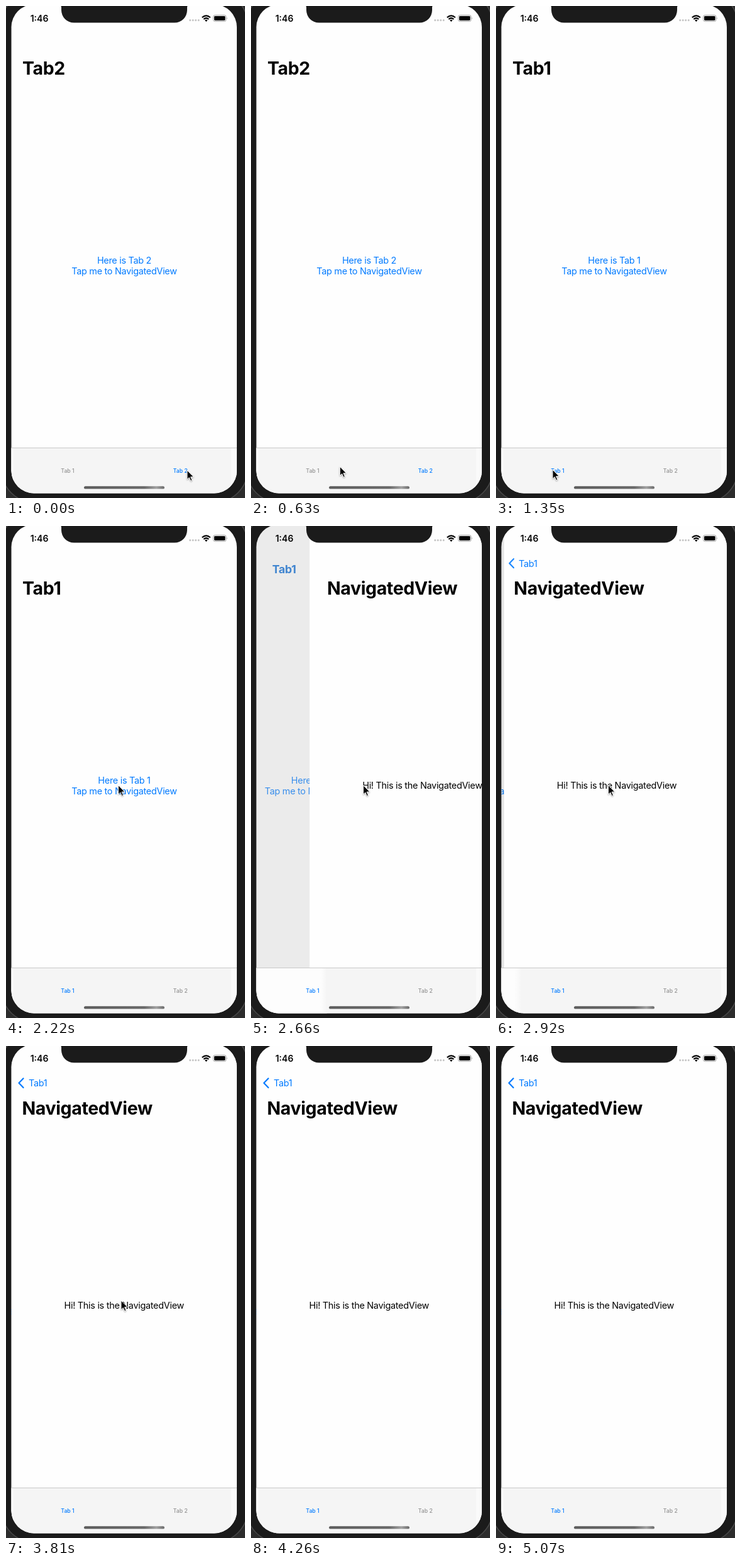
Write an HTML page that moves like this. It is 380 by 781 pixels and loops after 5.17 s.

```html
<!DOCTYPE html>
<html lang="en">
<head>
<meta charset="utf-8">
<title>Tab navigation</title>
<style>
  html, body { margin: 0; width: 100%; height: 100%; overflow: hidden; background: #1b1b1b; }
  svg { display: block; width: 100%; height: 100%; }
  text { font: 400 14.4px Inter, Roboto, sans-serif; letter-spacing: -.019em; font-optical-sizing: none; }
  .center { text-anchor: middle; }
  .title { font-weight: 700; font-size: 28.5px; letter-spacing: -.013em; }
  .tab { font-weight: 500; font-size: 8.7px; letter-spacing: 0; text-anchor: middle; }
  .clock { font-weight: 600; font-size: 14px; letter-spacing: 0; }
  .blue { fill: #007aff; }
  #cursor { filter: drop-shadow(0 1px 1px rgba(0, 0, 0, .35)); }
</style>
</head>
<body>
<svg viewBox="0 0 380 781">
  <defs>
    <clipPath id="screen"><rect x="8.5" y="-2.5" width="358.5" height="776" rx="36"/></clipPath>
    <linearGradient id="fade"><stop stop-color="#fdfdfd"/><stop offset="1" stop-color="#f5f5f5"/></linearGradient>
    <linearGradient id="bar">
      <stop stop-color="#5c5c5c"/><stop offset=".75" stop-color="#686868"/>
      <stop offset=".9" stop-color="#a0a0a0"/><stop offset="1" stop-color="#686868"/>
    </linearGradient>
  </defs>

  <rect width="380" height="781" fill="#2c2c2c"/>
  <rect x="-7" y="-23" width="391" height="811" rx="52" fill="#1b1b1b" stroke="#484848" stroke-width="1.5"/>

  <g clip-path="url(#screen)">
    <rect width="380" height="781" fill="#fefefe"/>
    <g id="parent" class="blue center">
      <text id="hello" x="188" y="408.7"></text>
      <text x="188" y="426.4">Tap me to NavigatedView</text>
    </g>
    <rect id="dim" width="380" height="702"/>
    <g id="page">
      <rect x="8.5" width="360" height="702" fill="#fefefe"/>
      <text class="center" x="187.8" y="417.2">Hi! This is the NavigatedView</text>
    </g>

    <text id="newTitle" class="title" y="109">NavigatedView</text>
    <text id="oldTitle" class="title"></text>
    <text id="back" class="blue"></text>
    <path id="chevron" d="M8 -7.3L1 0L8 7.3" fill="none" stroke="#007aff" stroke-width="2.2" stroke-linecap="round" stroke-linejoin="round"/>

    <rect y="701" width="380" height="80" fill="#f5f5f5"/>
    <rect id="glow" y="702" height="80" fill="#fdfdfd"/>
    <rect id="glowEdge" y="702" height="80" fill="url(#fade)"/>
    <rect x="358" y="702" width="10" height="80" fill="#fafafa"/>
    <rect y="701" width="380" height="1" fill="#c8c8c8"/>
    <text id="tab1" class="tab" x="98" y="740.7">Tab 1</text>
    <text id="tab2" class="tab" x="277.3" y="740.7">Tab 2</text>
    <rect x="124" y="762.2" width="128" height="4.4" rx="2.2" fill="url(#bar)"/>

    <path d="M82 -3Q88 -3 88 3V6.5A20 20 0 0 0 108 26.5H268A20 20 0 0 0 288 6.5V3Q288 -3 294 -3Z" fill="#1b1b1b"/>
    <text class="clock" x="38.7" y="24.5">1:46</text>
    <path d="M292.7 22.6h13.6" stroke="#c6c6c6" stroke-width="3.1" stroke-linecap="round" stroke-dasharray="0 4.5"/>
    <g fill="none" stroke="#000" stroke-width="2.2">
      <path d="M311.8 18.3Q318.3 12.5 324.8 18.3"/>
      <path d="M314.3 21Q318.3 17.5 322.3 21"/>
    </g>
    <path d="M316 22.6Q318.3 20.8 320.6 22.6L318.3 25Z"/>
    <rect x="329.5" y="14.5" width="20.5" height="10" rx="2.8" fill="none" stroke="#a2a2a2"/>
    <rect x="331" y="16" width="17.5" height="7" rx="1.4"/>
    <path d="M351.2 17.8q1.6 1.7 0 3.4z" fill="#999"/>
  </g>

  <path id="cursor" d="M0 0V14.5L3.3 11.5L5.8 17L8 16L5.6 10.6H10.3Z" stroke="#fff"/>
</svg>

<script>
const LOOP = 5170, PUSH = 2570, TAB_SWITCH = 1350, PRESS = 2400;
const BLUE = '#007aff', GREY = '#929292';
const $ = id => document.getElementById(id);
const clamp = (v, lo = 0, hi = 1) => Math.min(hi, Math.max(lo, v));
const set = (id, attrs) => {
  for (const name in attrs) $(id).setAttribute(name, attrs[name]);
};

// Index of the current step in an evenly stepped move, -1 before it begins.
const stepAt = (t, start, end, count) =>
  t < start ? -1 : Math.min(count - 1, Math.floor((t - start) / (end - start) * (count - 1) + 1e-6));

const bezier = (u, a, b, c, d) => {
  const v = 1 - u;
  return v * v * v * a + 3 * v * v * u * b + 3 * v * u * u * c + u * u * u * d;
};

function cursorAt(t) {
  const leave = stepAt(t, 3810, 4260, 6);
  if (leave >= 0) {
    const u = leave / 4;
    return [183 + 88 * u ** 1.2, 404 + 352 * u ** 1.5];
  }
  const rise = stepAt(t, TAB_SWITCH, 2220, 11);
  if (rise >= 0) {
    const u = 1 - (1 - rise / 10) ** 1.76;
    return [bezier(u, 90, 30, 180, 178.5), bezier(u, 736, 690, 497, 411.5)];
  }
  const u = (stepAt(t, 360, 810, 6) + 1) / 6;
  const eased = u * u * (3 - 2 * u);
  return [288 - 198 * eased, 737 - eased - 6 * Math.sin(Math.PI * u)];
}

// Share of the push still to go: a critically damped spring.
function pushLeft(t) {
  const step = stepAt(t, PUSH, 3010, 6);
  if (step < 0) return 1;
  if (step === 5) return 0;
  const wt = 20.8 * (0.0452 + step * 0.088);
  return (1 + wt) * Math.exp(-wt);
}

function drawPush(p, pressed) {
  const done = 1 - p, shift = 358.5 * p;
  set('parent', { transform: `translate(${-108 * done})`, opacity: pressed ? Math.max(.2, done) : 1 });
  set('dim', { opacity: .1 * done });
  set('page', { transform: `translate(${shift})` });
  set('newTitle', { x: 25.5 + 521 * p ** 1.176 });

  // The large title shrinks into the back label.
  const label = { x: 36 - 10 * p, y: 64 + 45 * p };
  const size = `${14.4 + 14.1 * p}px`;
  set('oldTitle', { ...label, opacity: clamp(3 * p), fill: `rgb(0,${122 * done},${255 * done})` });
  set('back', { ...label, opacity: clamp(1 - 4 * p) });
  $('oldTitle').style.fontSize = $('back').style.fontSize = size;
  set('chevron', {
    transform: `translate(${19.5 + 70 * p} ${58.8 + 40 * p}) scale(${clamp(1 - 3 * p, .1)})`,
    opacity: clamp(1 - 9 * p)
  });

  const moving = p < 1 && p > .01;
  const edge = moving ? 36 + shift : 13;
  const soft = moving ? 10 : 4;
  set('glow', { width: edge - soft });
  set('glowEdge', { x: edge - soft, width: soft });
}

function draw(t) {
  const n = t < TAB_SWITCH ? 2 : 1;
  $('hello').textContent = `Here is Tab ${n}`;
  $('oldTitle').textContent = $('back').textContent = `Tab${n}`;
  set('tab1', { fill: n === 1 ? BLUE : GREY });
  set('tab2', { fill: n === 2 ? BLUE : GREY });
  drawPush(pushLeft(t), t >= PRESS);
  set('cursor', { transform: `translate(${cursorAt(t)})` });
}

const origin = performance.now();
function loop() {
  draw((performance.now() - origin) % LOOP);
  requestAnimationFrame(loop);
}
loop();
</script>
</body>
</html>
```
